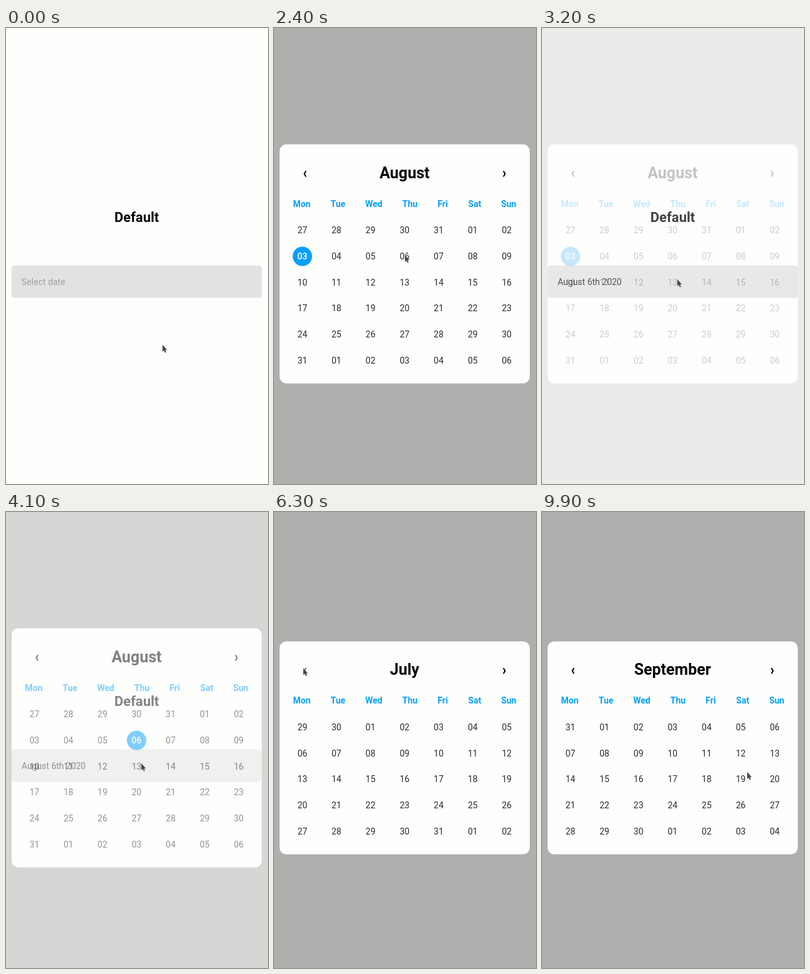
An HTML page with a canvas for the animation above (10 s loop, 420 px wide and 731 px high).

```html
<!DOCTYPE html>
<html lang="en">
<head>
<meta charset="utf-8">
<title>Date picker</title>
<style>
html, body { margin: 0; width: 100%; height: 100%; overflow: hidden; background: #fefefd; }
canvas { display: block; width: 420px; height: 731px; }
</style>
</head>
<body>
<canvas id="stage"></canvas>
<script>
const W = 420, H = 731, LOOP = 10000, STEP = 100;
const PAPER = '#fefefd', BLUE = '#049ffe', INK = '#2b2b2b';
const FONT = 'Roboto, Arial, sans-serif';
const MONTHS = ['January', 'February', 'March', 'April', 'May', 'June', 'July',
  'August', 'September', 'October', 'November', 'December'];
const WEEKDAYS = [['Mon', 44.5], ['Tue', 102.5], ['Wed', 160], ['Thu', 218],
  ['Fri', 270.5], ['Sat', 321.7], ['Sun', 376.3]];

// [press, release, month step]
const PRESSES = [[5400, 5500, -1], [6100, 6400, -1], [7900, 8000, 1],
  [8400, 8500, 1], [9300, 9400, 1]];

const clamp = u => Math.min(1, Math.max(0, u));
const smooth = u => { u = clamp(u); return u * u * (3 - 2 * u); };
const linear = u => u;
const easeOut = u => 1 - (1 - u) * (1 - u);

// Pointer stops: time, x, y, easing into the stop, downward bow
const STOPS = [
  [0, 251, 508], [400, 251, 508], [900, 231, 407],
  [1700, 231, 407], [2400, 210, 364],
  [3000, 210, 364], [3200, 217, 403],
  [4200, 217, 403], [4700, 110.5, 238.5, linear], [5000, 47.5, 234, easeOut], [5100, 47, 233],
  [5600, 47, 233], [5900, 47, 250.5],
  [6600, 47, 250.5], [7500, 368.5, 256, smooth, 34],
  [8600, 368.5, 256], [9100, 366, 236],
  [9400, 366, 236], [9900, 329, 417], [LOOP, 329, 417]
];

const canvas = document.getElementById('stage');
const ctx = canvas.getContext('2d');
const ratio = window.devicePixelRatio || 1;
canvas.width = W * ratio;
canvas.height = H * ratio;

function pointerAt(t) {
  const i = STOPS.findIndex(s => s[0] > t);
  const [t0, x0, y0] = STOPS[i - 1];
  const [t1, x1, y1, ease = smooth, bow = 0] = STOPS[i];
  const u = ease((t - t0) / (t1 - t0));
  return [x0 + (x1 - x0) * u, y0 + (y1 - y0) * u + bow * Math.sin(Math.PI * u)];
}

function modalAlpha(t) {
  if (t < 3000) return smooth((t - 1300) / 400);
  if (t < 3900) return 1 - smooth((t - 3000) / 290);
  return smooth((t - 3900) / 400);
}

function text(str, x, y, size, weight, color, align = 'center') {
  ctx.font = `${weight} ${size}px ${FONT}`;
  ctx.textAlign = align;
  ctx.fillStyle = color;
  ctx.fillText(str, x, y);
}

function box(x, y, w, h, r, color) {
  ctx.beginPath();
  ctx.roundRect(x, y, w, h, r);
  ctx.fillStyle = color;
  ctx.fill();
}

function chevron(x, y, dir, alpha) {
  ctx.save();
  ctx.globalAlpha *= alpha;
  ctx.translate(x, y);
  ctx.scale(dir, 1);
  ctx.beginPath();
  ctx.moveTo(-2.2, -4.7);
  ctx.lineTo(-0.2, -4.7);
  ctx.lineTo(2.6, 0);
  ctx.lineTo(-0.2, 4.7);
  ctx.lineTo(-2.2, 4.7);
  ctx.lineTo(0.1, 0);
  ctx.closePath();
  ctx.fillStyle = '#000';
  ctx.fill();
  ctx.restore();
}

function arrowAlpha(t, dir) {
  for (const [down, up, step] of PRESSES) {
    if (step !== dir) continue;
    if (t >= down && t < up) return 0.65;
    if (t >= up && t < up + STEP) return 0.8;
  }
  return 1;
}

function drawForm(t) {
  ctx.fillStyle = PAPER;
  ctx.fillRect(0, 0, W, H);
  text('Default', 209.5, 310.5, 22, 700, '#0a0a0a');
  box(9, 380.5, 401, 52, 4.5, '#e2e2e0');
  if (t >= 3100) text('August 6th 2020', 25, 412.3, 14, 400, '#222', 'left');
  else text('Select date', 25, 412.3, 14.1, 400, '#a2a2a0', 'left');
}

function drawCalendar(t) {
  const month = PRESSES.reduce((m, [, up, step]) => t >= up ? m + step : m, 7);
  const lead = (new Date(2020, month, 1).getDay() + 6) % 7;
  const length = new Date(2020, month + 1, 0).getDate();
  const rows = Math.ceil((lead + length) / 7);
  const picked = t < 3900 ? 3 : 6;
  const height = 132.3 + rows * 41.8;
  const top = 378.1 - height / 2;

  box(9, top, 401, height, 10.5, PAPER);
  text(MONTHS[month], 209.3, top + 54, 25, 700, '#060606');
  chevron(50, top + 47.2, -1, arrowAlpha(t, -1));
  chevron(369, top + 47.2, 1, arrowAlpha(t, 1));
  for (const [name, x] of WEEKDAYS) text(name, x, top + 100, 14, 700, BLUE);

  for (let i = 0; i < rows * 7; i++) {
    const date = new Date(2020, month, 1 - lead + i);
    const x = 45.5 + (i % 7) * 54.6;
    const y = top + 137.4 + Math.floor(i / 7) * 41.8;
    const on = date.getMonth() === 7 && date.getDate() === picked;
    if (on) {
      ctx.beginPath();
      ctx.arc(x, y + 42 - 41.8, 15.5, 0, Math.PI * 2);
      ctx.fillStyle = BLUE;
      ctx.fill();
    }
    const label = String(date.getDate()).padStart(2, '0');
    text(label, x, y + 5, 14, on ? 500 : 400, on ? '#fff' : INK);
  }
}

// The modal fades as one flat layer
const layer = document.createElement('canvas');
layer.width = canvas.width;
layer.height = canvas.height;
const layerCtx = layer.getContext('2d');

function drawModal(t, alpha) {
  ctx.globalAlpha = 1;
  drawCalendar(t);
  layerCtx.clearRect(0, 0, layer.width, layer.height);
  layerCtx.drawImage(canvas, 0, 0);
  ctx.clearRect(0, 0, W, H);
  drawForm(t);
  ctx.globalAlpha = alpha;
  ctx.fillStyle = 'rgba(0,0,0,0.312)';
  ctx.beginPath();
  ctx.rect(0, 0, W, H);
  ctx.fill();
  ctx.globalAlpha = 1;
}

function drawPointer(t) {
  const [x, y] = pointerAt(t);
  ctx.save();
  ctx.translate(x, y);
  ctx.beginPath();
  ctx.moveTo(0, 0);
  ctx.lineTo(0, 10.8);
  ctx.lineTo(2.3, 8.8);
  ctx.lineTo(4, 12.6);
  ctx.lineTo(5.7, 11.8);
  ctx.lineTo(4.1, 8.2);
  ctx.lineTo(7, 8);
  ctx.closePath();
  ctx.lineJoin = 'round';
  ctx.lineWidth = 1.4;
  ctx.strokeStyle = 'rgba(215,215,215,0.7)';
  ctx.stroke();
  ctx.fillStyle = '#474747';
  ctx.fill();
  ctx.restore();
}

function draw(t) {
  const alpha = modalAlpha(t);
  ctx.setTransform(ratio, 0, 0, ratio, 0, 0);
  ctx.globalAlpha = 1;
  ctx.textBaseline = 'alphabetic';
  if (alpha > 0) {
    // Compose the open state, then blend it over the form
    drawForm(t);
    ctx.fillStyle = 'rgba(0,0,0,0.312)';
    ctx.fillRect(0, 0, W, H);
    drawCalendar(t);
    layerCtx.clearRect(0, 0, layer.width, layer.height);
    layerCtx.drawImage(canvas, 0, 0);
    drawForm(t);
    ctx.globalAlpha = alpha;
    ctx.drawImage(layer, 0, 0, W, H);
    ctx.globalAlpha = 1;
  } else {
    drawForm(t);
  }
  drawPointer(t);
}

function tick() {
  const t = performance.now() % LOOP;
  draw(Math.floor(t / STEP) * STEP);
  requestAnimationFrame(tick);
}
tick();
</script>
</body>
</html>
```
